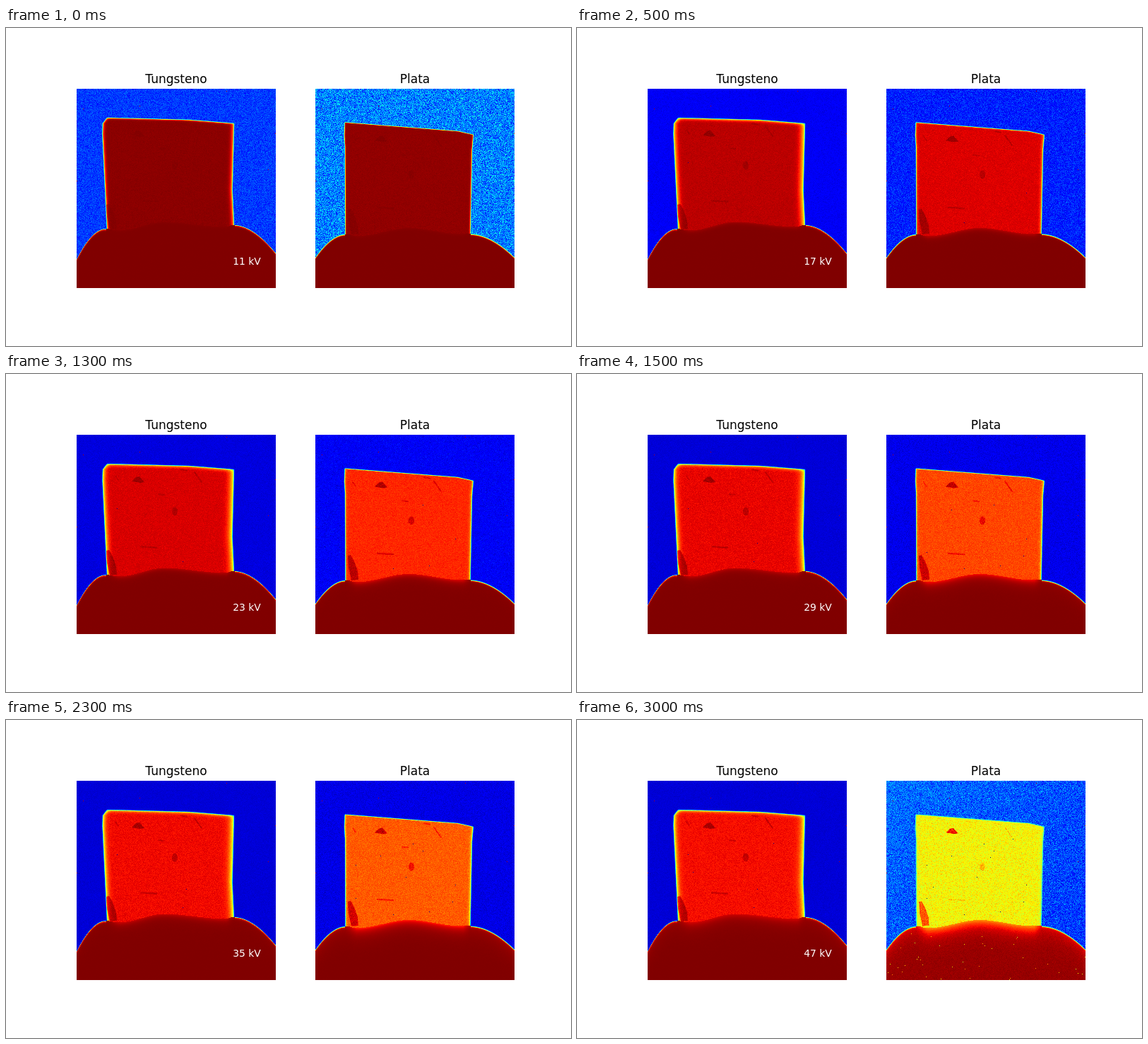
Recreate the animation shown at these times as an HTML page with a canvas. Size 800 by 450 pixels, loop 3500 ms.

```html
<!DOCTYPE html>
<html lang="es">
<head>
<meta charset="utf-8">
<style>
  html, body { margin: 0; width: 800px; height: 450px; overflow: hidden; background: #fff; }
  canvas { display: block; }
</style>
</head>
<body>
<canvas id="stage" width="800" height="450"></canvas>
<script>
const SIZE = 282, TOP = 86, STEPS = 7, STEP_MS = 500;
const ctx = document.getElementById('stage').getContext('2d');

// Outlines are key points in stage pixels: sides as [y, x], top and ridge as [x, y].
const tungsten = {
  title: 'Tungsteno', x: 100,
  left: [[127, 143], [135, 137], [150, 136.5], [284, 143]],
  right: [[133, 323], [230, 320.5], [281, 323]],
  top: [[144, 127], [260, 130], [323, 135]],
  ridge: [[140, 284.5], [160, 287], [224, 275], [310, 282], [323, 279]],
  drop: [43, 40],
  back: { floor: .075, gain: .105, tau: .8 },
  body: { floor: .895, gain: .095, tau: 1.7 },
  grain: .2, fade: 4.6, rim: 1.2, soft: .4, halo: .025, drift: 0,
  marks: { lump: [187, 150], nick: [157, 147], dash: [252, 136], slash: [272, 146],
    fleck: [220, 170.5], blob: [239, 194.5], bar: [202, 245], wedge: [142, 249] }
};
const silver = {
  title: 'Plata', x: 438,
  left: [[133, 479.7], [152, 479], [168, 480], [292, 480.5]],
  right: [[149, 662], [172, 660], [292, 657.5]],
  top: [[479, 133.5], [640, 146], [662, 151]],
  ridge: [[480, 292], [497, 295], [570, 283.5], [645, 292], [658, 291.5]],
  drop: [33, 33],
  back: { floor: .085, gain: .165, tau: 1.1 },
  body: { floor: .78, gain: .205, tau: 2.4 },
  grain: .3, fade: 2, rim: 2.4, soft: .8, halo: .075, drift: 1,
  marks: { lump: [531, 157.5], nick: [493, 156], dash: [596, 147], slash: [611, 159],
    fleck: [565, 180], blob: [574, 207.5], bar: [537, 254.5], wedge: [484, 256] }
};
const hotPixels = [[9, 28], [89, 24], [212, 3], [271, 114], [281, 63], [0, 130]];

const clamp = (v, lo = 0, hi = 1) => Math.min(hi, Math.max(lo, v));
const mix = (a, b, t) => a + (b - a) * t;
const linear = u => u;
const smooth = u => u * u * (3 - 2 * u);
const decay = ({ floor, gain, tau }, step) => floor + gain * Math.exp(-((step / tau) ** 1.1));

function sample(points, t, ease = linear) {
  let i = 1;
  while (i < points.length - 1 && t > points[i][0]) i++;
  const [t0, v0] = points[i - 1], [t1, v1] = points[i];
  return mix(v0, v1, ease(clamp((t - t0) / (t1 - t0))));
}

// The holder: a wavy ridge behind the block, falling away on both sides.
function domeTop({ ridge, drop, x: x0 }, x) {
  const start = ridge[0][0], end = ridge[ridge.length - 1][0];
  const u = clamp((start - x) / (start - x0)), w = clamp((x - end) / (x0 + SIZE - end));
  return sample(ridge, x, smooth) + drop[0] * u ** 1.85 + drop[1] * w ** 1.85;
}

function jet(v) {
  const r = v < .89 ? (v - .35) / .31 : 1 - .5 * (v - .89) / .11;
  const g = v < .5 ? (v - .125) / .25 : (.91 - v) / .27;
  const b = v < .34 ? .5 + .5 * v / .11 : (.65 - v) / .31;
  return [r, g, b].map(c => 255 * clamp(c));
}

function makeRandom(seed) {
  return () => {
    seed = seed + 0x6D2B79F5 | 0;
    let t = Math.imul(seed ^ seed >>> 15, 1 | seed);
    t = t + Math.imul(t ^ t >>> 7, 61 | t) ^ t;
    return ((t ^ t >>> 14) >>> 0) / 4294967296;
  };
}

function makeCanvas() {
  const canvas = document.createElement('canvas');
  canvas.width = canvas.height = SIZE;
  return canvas;
}

// Coverage of the dense inclusions inside the block.
function drawMarks(panel) {
  const c = makeCanvas().getContext('2d', { willReadFrequently: true });
  c.filter = 'blur(0.6px)';
  c.lineCap = 'round';
  const at = (name, alpha, draw) => {
    const [x, y] = panel.marks[name];
    c.save();
    c.translate(x - panel.x, y - TOP);
    c.globalAlpha = alpha;
    c.beginPath();
    draw();
    c.restore();
  };
  const polygon = (...points) => () => {
    points.forEach(([x, y]) => c.lineTo(x, y));
    c.fill();
  };
  const line = (x, y, width) => () => {
    c.lineWidth = width;
    c.moveTo(-x, -y);
    c.lineTo(x, y);
    c.stroke();
  };
  at('lump', 1, polygon([-9, 2], [-3, -4], [2, -5], [9, 3], [3, 4]));
  at('nick', .5, line(2, 3, 1.5));
  at('dash', .6, line(4, .7, 2));
  at('slash', .6, line(5, 7, 2));
  at('fleck', .5, line(4, .5, 2));
  at('blob', .65, () => { c.ellipse(0, 0, 4, 6, 0, 0, 7); c.fill(); });
  at('bar', .6, line(11, .6, 2.4));
  at('wedge', .9, polygon([0, 1], [4, 0], [9, 9], [14, 23], [15, 35], [5, 36], [1, 18]));
  return c.getImageData(0, 0, SIZE, SIZE).data;
}

// Thin material near an outline absorbs less.
function edge(depth, fade) {
  const d = Math.max(depth + .8, 0);
  return clamp(d / 1.6) * (1 - .43 * Math.exp(-((d / fade) ** 1.4)));
}

function renderPanel(panel, step, marks) {
  const canvas = makeCanvas(), c = canvas.getContext('2d');
  const image = c.createImageData(SIZE, SIZE);
  const random = makeRandom(panel.x * 97 + step * 1013);
  const noise = () => (random() + random() + random() - 1.5) * 2;

  const progress = step / (STEPS - 1);
  const haze = panel.drift * progress ** 16;
  const back = decay(panel.back, step) + .115 * haze;
  const body = decay(panel.body, step) - .145 * haze;
  const backNoise = panel.grain * (back - .04);
  const bodyNoise = .003 + .08 * (1 - body);
  const fade = panel.fade * Math.min(1, .6 + .4 * step);
  const soft = 2 + panel.soft * step;
  const put = (px, py, v) => image.data.set([...jet(clamp(v)), 255], (py * SIZE + px) * 4);

  for (let py = 0; py < SIZE; py++) {
    const y = py + TOP + .5;
    const left = sample(panel.left, y), right = sample(panel.right, y);
    for (let px = 0; px < SIZE; px++) {
      const x = px + panel.x + .5;
      const fromTop = y - sample(panel.top, x);
      const inside = Math.min(x - left, right - x, fromTop) > -.8;
      let v = back + haze * .07 * (.5 - (px + py) / (2 * SIZE));
      let spread = backNoise;
      if (inside) {
        const cover = edge(x - left, fade * .9) * edge(right - x, fade * 1.2) * edge(fromTop, fade * .55);
        const mark = (marks[(py * SIZE + px) * 4 + 3] / 255) ** (1 + 2 * haze);
        v = mix(mix(v, body, cover), 1, .68 * mark);
        spread = bodyNoise;
      }
      const depth = y - domeTop(panel, x);
      if (depth > -.5) {
        const d = Math.max(depth, 0);
        const level = 1 - .02 * haze - panel.halo * progress ** 2 * Math.exp(-d / 12);
        if (inside) {
          const front = clamp((x - left) / 16) * clamp((right - x) / 10);
          v = mix(level, body, .55 * front * Math.exp(-d / soft));
        } else {
          v = mix(v, level, clamp((depth + .5) / panel.rim) * (1 - .35 * Math.exp(-d)));
        }
        spread = .001 + .006 * haze;
      }
      put(px, py, v + noise() * spread);
    }
  }

  hotPixels.forEach(([px, py]) => put(px, py, .95));
  const scatter = makeRandom(panel.x);
  const spot = (from, height) => [Math.floor(scatter() * SIZE), from + Math.floor(scatter() * height)];
  for (let i = 0; i < step * (1 + 2 * panel.drift); i++) {
    const [px, py] = spot(64, 130);
    put(px, py, 0);
  }
  for (let i = 0; i < Math.round(48 * haze); i++) {
    const [px, py] = spot(210, 72);
    if (py + TOP > domeTop(panel, px + panel.x) + 6) put(px, py, .6 + scatter() * .2);
  }
  c.putImageData(image, 0, 0);
  return canvas;
}

const panels = [tungsten, silver].map(panel => {
  const marks = drawMarks(panel);
  return { ...panel, views: Array.from({ length: STEPS }, (_, i) => renderPanel(panel, i, marks)) };
});

function text(value, x, y, size, color) {
  ctx.font = `${size}px "DejaVu Sans", sans-serif`;
  ctx.fillStyle = color;
  ctx.fillText(value, x, y);
}

function draw(step) {
  ctx.fillStyle = '#fff';
  ctx.fillRect(0, 0, 800, 450);
  ctx.textAlign = 'center';
  for (const panel of panels) {
    ctx.drawImage(panel.views[step], panel.x, TOP);
    text(panel.title, panel.x + SIZE / 2, 78, 17, '#000');
  }
  text(`${11 + 6 * step} kV`, 341, 335, 13.889, '#fff');
}

const start = performance.now();
let shown = -1;
function tick() {
  const step = Math.floor((performance.now() - start) / STEP_MS) % STEPS;
  if (step !== shown) draw(shown = step);
  requestAnimationFrame(tick);
}
tick();
</script>
</body>
</html>
```
